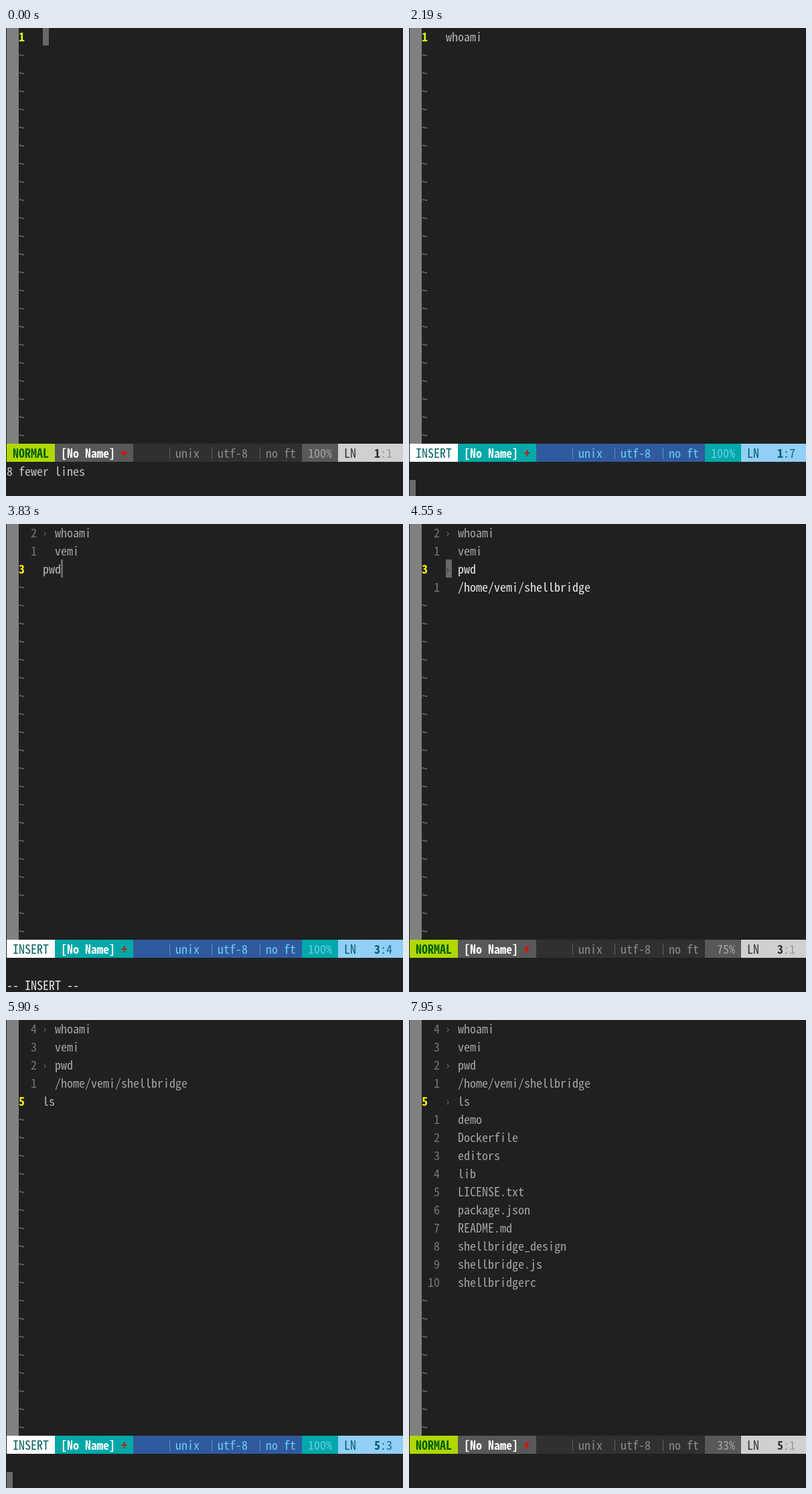
Animation, 593 px wide and 698 px high, one loop 7.99 s. Source, as an HTML page with a canvas:

```html
<!DOCTYPE html>
<html lang="en">
<head>
<meta charset="utf-8">
<title>Shell commands inside an editor</title>
<style>
  html, body { margin: 0; width: 100%; height: 100%; overflow: hidden; background: #202020; }
  canvas { display: block; }
</style>
</head>
<body>
<canvas id="screen" width="593" height="698"></canvas>
<script>
const ctx = document.getElementById("screen").getContext("2d");
const CELL = 9, LINE = 27, STATUS = 23, LOOP = 7990;
const TEXT = 6; // first text column
const family = '"Noto Sans Mono CJK JP", "Noto Sans Mono", monospace';

// Pick the size whose advance equals one cell.
ctx.font = `18px ${family}`;
const size = 18 * CELL / ctx.measureText("M").width;

const output = [
  "› whoami", "  vemi", "› pwd", "  /home/vemi/shellbridge", "› ls",
  ..."demo Dockerfile editors lib LICENSE.txt package.json README.md shellbridge_design shellbridge.js shellbridgerc"
    .split(" ").map(name => "  " + name)
];

const themes = {
  NORMAL: {
    mode: ["#afd700", "#005f00"], file: "#585858", plus: "#ff0000",
    middle: ["#303030", "#8a8a8a"], bar: "#626250", percent: ["#585858", "#a8a8a8"],
    place: ["#d0d0d0", "#303038"], column: "#9a9a9a"
  },
  INSERT: {
    mode: ["#ffffff", "#005f5f"], file: "#00a8a8", plus: "#c01818",
    middle: ["#305a9e", "#68cdf2"], bar: "#5596b8", percent: ["#00a8a8", "#68cdf2"],
    place: ["#92cff6", "#005f6f"], column: "#0f6b85"
  }
};

// Each step overrides part of the state from its time on.
const insert = (t, row) =>
  [t, { mode: "INSERT", row, done: row, draft: "", cursor: "bar", message: "-- INSERT --" }];
const type = (word, start, end) => [...word].map((_, i) =>
  [start + (end - start) * i / (word.length - 1), { draft: word.slice(0, i + 1) }]);
const run = t => [t, { cursor: "command", message: "" }];
const result = (t, row, done) =>
  [t, { mode: "NORMAL", row, done, draft: null, fresh: row, cursor: "block" }];
const settle = t => [t, { fresh: Infinity }];

const steps = [
  [0, { mode: "NORMAL", row: 0, done: 0, draft: "", fresh: Infinity, cursor: "block", message: "8 fewer lines" }],
  [220, { cursor: "" }],
  [470, { cursor: "block" }],
  insert(870, 0),
  ...type("whoami", 1330, 1860),
  run(2190), result(2680, 0, 2), settle(3130),
  [3310, { row: 1 }],
  [3350, { cursor: "select" }],
  insert(3390, 2),
  ...type("pwd", 3590, 3830),
  run(4040), result(4510, 2, 4),
  [4810, { row: 3 }],
  settle(5030),
  insert(5120, 4),
  ...type("ls", 5600, 5690),
  run(5900), result(6430, 4, 15), settle(6890),
  [7300, { cursor: "" }],
  [7550, { cursor: "block" }],
  [7950, { cursor: "" }]
];

const cellX = col => 1 + col * CELL;
const cellY = row => row * LINE - 1;

function fill(col, row, cols, color, rows = 1) {
  ctx.fillStyle = color;
  ctx.fillRect(cellX(col), cellY(row), cols * CELL, rows * LINE);
}

function put(col, row, text, color, bold) {
  ctx.font = `${bold ? "bold " : ""}${size}px ${family}`;
  ctx.fillStyle = color;
  ctx.fillText(text, cellX(col), cellY(row) + 21);
}

function drawCursor({ cursor, row, draft }) {
  if (cursor === "block") fill(TEXT, row, 1, "#686868");
  if (cursor === "command") fill(0, 25, 1, "#686868");
  ctx.fillStyle = "#686868";
  if (cursor === "bar") ctx.fillRect(cellX(TEXT + draft.length), cellY(row), 3, LINE);
  if (cursor === "select") {
    ctx.fillRect(cellX(TEXT + 1), cellY(row), 1, LINE);
    fill(TEXT + 2, row, 4, "#585858");
  }
}

function drawLines(state, lines) {
  for (let row = 0; row < STATUS; row++) {
    if (row >= lines.length) {
      put(2, row, "~", "#777777");
      continue;
    }
    const selecting = state.cursor === "select";
    if (row === state.row && !selecting) {
      put(2, row, String(row + 1), row ? "#ffee10" : "#d0ff10", true);
    } else {
      const distance = selecting ? 1 : Math.abs(row - state.row);
      put(2, row, String(distance).padStart(3), "#767676");
    }
    if (row === state.done) {
      put(TEXT, row, lines[row], "#b4b4b4");
      continue;
    }
    const bright = row >= state.fresh || (selecting && row === state.row);
    const covered = row === state.row && state.cursor === "block";
    put(TEXT, row, lines[row][0], covered ? "#444444" : "#606060");
    put(TEXT + 2, row, lines[row].slice(2), bright ? "#e8e8e8" : "#a4a4a4");
  }
}

function drawStatus({ mode, row, draft }, total) {
  const theme = themes[mode];
  fill(0, STATUS, 8, theme.mode[0]);
  fill(8, STATUS, 13, theme.file);
  fill(21, STATUS, 28, theme.middle[0]);
  fill(49, STATUS, 6, theme.percent[0]);
  fill(55, STATUS, 11, theme.place[0]);
  put(1, STATUS, mode, theme.mode[1], mode === "NORMAL");
  put(9, STATUS, "[No Name]", "#ffffff", true);
  put(19, STATUS, "+", theme.plus, true);
  for (const [col, label] of [[27, "unix"], [34, "utf-8"], [42, "no ft"]]) {
    ctx.fillStyle = theme.bar;
    ctx.fillRect(cellX(col), cellY(STATUS) + 6, 1, 17);
    put(col + 1, STATUS, label, theme.middle[1]);
  }
  const percent = Math.floor((row + 1) * 100 / total) + "%";
  put(50, STATUS, percent.padStart(4), theme.percent[1]);
  put(56, STATUS, "LN", theme.place[1]);
  put(61, STATUS, String(row + 1), theme.place[1], true);
  put(62, STATUS, ":" + ((draft || "").length + 1), theme.column);
}

function draw(now) {
  const t = now % LOOP;
  const state = Object.assign({}, ...steps.filter(([at]) => at <= t).map(step => step[1]));
  const lines = output.slice(0, state.done);
  if (state.draft !== null) lines.push(state.draft);

  ctx.fillStyle = "#202020";
  ctx.fillRect(0, 0, 593, 698);
  fill(0, 0, 2, "#808080", STATUS);
  drawCursor(state);
  drawLines(state, lines);
  drawStatus(state, lines.length);
  const inserting = state.mode === "INSERT";
  put(0, inserting ? 25 : 24, state.message, inserting ? "#e8e8e8" : "#c4c4c4");
  requestAnimationFrame(draw);
}

requestAnimationFrame(draw);
</script>
</body>
</html>
```
